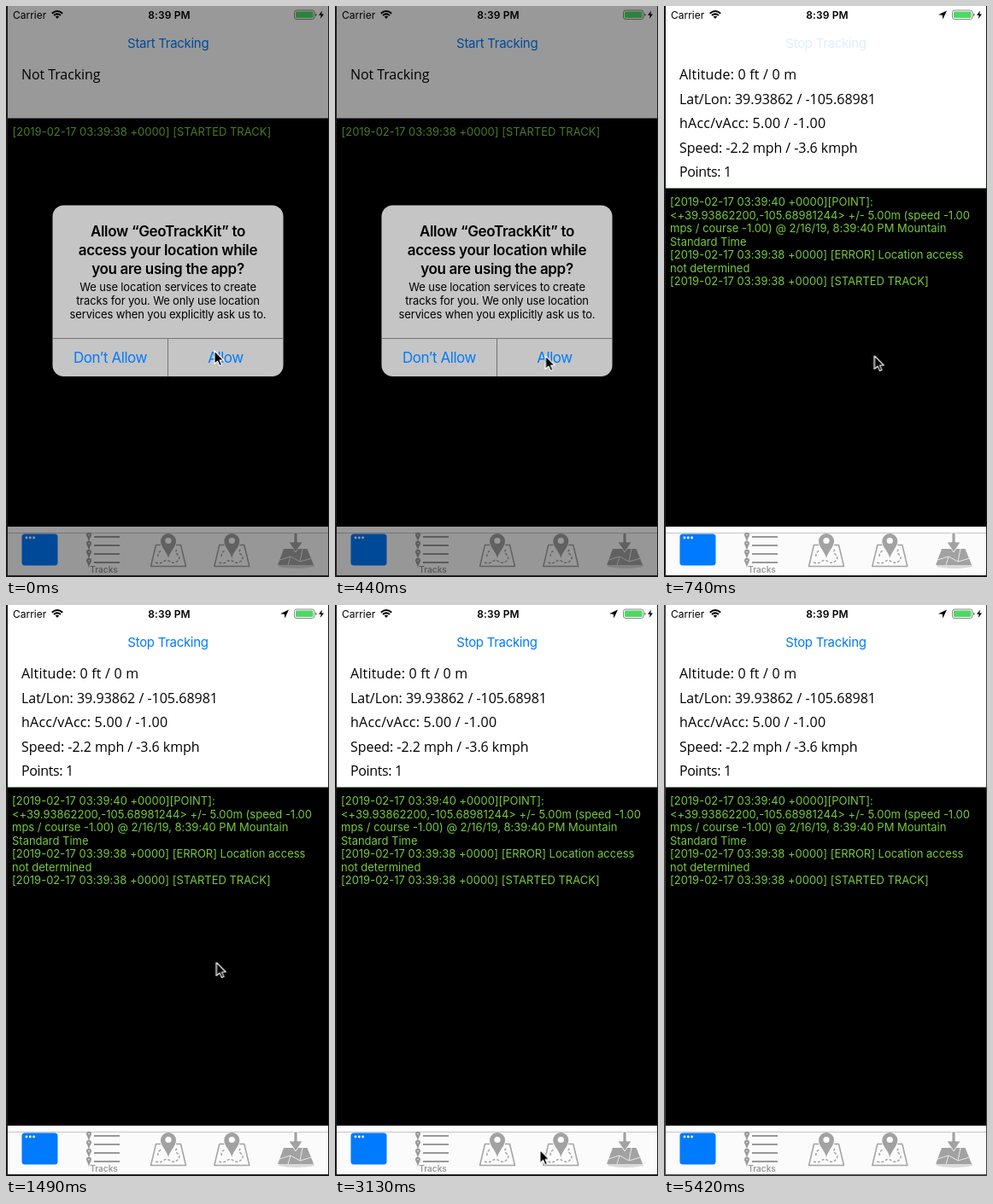
Animation, 378 px wide and 669 px high, one loop 5520 ms. Source, as an HTML page:

```html
<!DOCTYPE html>
<html lang="en">
<head>
<meta charset="utf-8">
<title>Location permission</title>
<style>
html, body { margin: 0; width: 100%; height: 100%; overflow: hidden; background: #000; }
svg { display: block; width: 100%; height: 100%; font-family: Inter, "Liberation Sans", sans-serif; }
.mid { text-anchor: middle; }
.link { font-size: 15px; letter-spacing: -.3px; fill: #007aff; }
.info { font: 16px "Open Sans", "Noto Sans", sans-serif; }
.log { font-size: 13px; letter-spacing: -.01px; fill: #78c93c; }
.title { font-size: 17px; font-weight: 600; letter-spacing: -.32px; }
.body { font-size: 13px; letter-spacing: -.14px; }
.button { font-size: 17px; letter-spacing: -.45px; fill: #007aff; }

.before, .after, .dim, .alert, .press, .short, .stop, .edge, .cursor {
  animation: 5520ms step-end infinite;
}
.before { animation-name: before; }
.after { animation-name: after; }
.dim { animation-name: dim; }
.alert { animation-name: alert; }
.press { animation-name: press; }
.short { animation-name: short; }
.stop { animation-name: stop; }
.edge { animation-name: edge; }
.cursor { animation-name: cursor; }

@keyframes before { 0% { opacity: 1 } 10.68%, 100% { opacity: 0 } }
@keyframes after { 0% { opacity: 0 } 10.68%, 100% { opacity: 1 } }
@keyframes dim { 0% { opacity: .4 } 10.68% { opacity: .05 } 13.4%, 100% { opacity: 0 } }
@keyframes alert { 0% { opacity: 1 } 10.68% { opacity: .12 } 13.4%, 100% { opacity: 0 } }
@keyframes press { 0% { opacity: 0 } 5.43% { opacity: 1 } 7.97%, 100% { opacity: 0 } }
@keyframes short { 0% { opacity: 0 } 10.68% { opacity: .45 } 13.4%, 100% { opacity: 0 } }
@keyframes stop {
  0% { opacity: 0 }
  13.4% { opacity: .13 }
  16.12% { opacity: .65 }
  18.84%, 100% { opacity: 1 }
}
@keyframes edge { 0% { fill: #1a1a1b } 98.18%, 100% { fill: #404042 } }
@keyframes cursor {
  0% { transform: translate(244px, 404px) }
  2.71% { transform: translate(246.5px, 410px) }
  26.99% { transform: translate(246.5px, 419px) }
  29.71% { transform: translate(250.5px, 503px) }
  32.42% { transform: translate(252px, 556px) }
  35.14% { transform: translate(241.5px, 594px) }
  37.68% { transform: translate(240px, 611.5px) }
  40.39% { transform: translate(240px, 626.5px) }
  43.11% { transform: translate(240px, 630.5px) }
  56.7% { transform: translate(240px, 638.5px) }
  59.42% { transform: translate(241px, 641.5px) }
  64.85% { transform: translate(259.5px, 655.5px); opacity: 1 }
  67.57%, 100% { transform: translate(259.5px, 655.5px); opacity: 0 }
}
</style>
</head>
<body>
<svg viewBox="0 0 378 669" preserveAspectRatio="none">
  <defs>
    <path id="pin" d="M0 5.6C-1-.4-3 -1.3-3-3.2a3 3 0 0 1 6 0C3-1.3 1-.4 0 5.6Z"/>
    <g id="row">
      <use href="#pin" y="1"/>
      <circle cy="-2.2" r=".8" fill="#fff"/>
      <path d="M6 0H36" stroke="#999" stroke-width="2"/>
    </g>
    <g id="map" fill="none" stroke="#a2a2a2">
      <path d="M-9 631.5H-14.5L-20.5 656.5H20.5L14.5 631.5H9" stroke-width="1.5" stroke-linejoin="round"/>
      <path d="M-15 652Q-10 654-6 651T2 651Q7 654 11 650T10 642Q7 639 11 636M-12 645Q-13 640-8 638" stroke-width="1.5" stroke-dasharray="3 2"/>
      <path d="M0 647C-1.5 639.5-9 634-9 627a9 9 0 0 1 18 0C9 634 1.5 639.5 0 647Z" fill="#a2a2a2" stroke="none"/>
      <circle cy="626.5" r="3.6" fill="#fff" stroke="none"/>
    </g>
  </defs>

  <rect class="edge" width="378" height="669"/>
  <rect x="2" width="375" height="667"/>

  <g class="before">
    <rect x="2" width="375" height="131.5" fill="#fff"/>
    <text class="link mid" x="189.7" y="48.5">Start Tracking</text>
    <text class="info" x="18" y="86" letter-spacing="-.08">Not Tracking</text>
    <text class="log" x="7.5" y="152">[2019-02-17 03:39:38 +0000] [STARTED TRACK]</text>
  </g>

  <g class="after">
    <rect x="2" width="375" height="213" fill="#fff"/>
    <rect x="2" y="213" width="375" height="1" fill="#6f8f6f"/>
    <text class="link mid short" x="189" y="48.5">Start…acking</text>
    <text class="link mid stop" x="189.5" y="48.5">Stop Tracking</text>
    <g class="info">
      <text x="18" y="86" letter-spacing=".2">Altitude: 0 ft / 0 m</text>
      <text x="18" y="114.5">Lat/Lon: 39.93862 / -105.68981</text>
      <text x="18" y="143" letter-spacing=".25">hAcc/vAcc: 5.00 / -1.00</text>
      <text x="18" y="171.5" letter-spacing="-.06">Speed: -2.2 mph / -3.6 kmph</text>
      <text x="18" y="200" letter-spacing="-.35">Points: 1</text>
    </g>
    <g class="log">
      <text x="7" y="234">[2019-02-17 03:39:40 +0000][POINT]:</text>
      <text x="7" y="249.5">&lt;+39.93862200,-105.68981244&gt; +/- 5.00m (speed -1.00</text>
      <text x="7" y="265">mps / course -1.00) @ 2/16/19, 8:39:40 PM Mountain</text>
      <text x="7" y="280.5">Standard Time</text>
      <text x="7" y="296">[2019-02-17 03:39:38 +0000] [ERROR] Location access</text>
      <text x="7" y="311.5">not determined</text>
      <text x="7" y="327">[2019-02-17 03:39:38 +0000] [STARTED TRACK]</text>
    </g>
    <path d="M331 5.5L321 10.2L325.8 10.8L326.3 15.5Z"/>
  </g>

  <!-- status bar -->
  <text x="8" y="14.5" font-size="12">Carrier</text>
  <g fill="none" stroke="#000" stroke-width="2">
    <path d="M53.8 8.7Q60 3.2 66.2 8.7M56 11.1Q60 7.6 64 11.1"/>
    <path d="M57.7 12.6Q60 10.8 62.3 12.6L60 15Z" fill="#000" stroke="none"/>
  </g>
  <text class="mid" x="191" y="14.5" font-size="12" font-weight="600" letter-spacing=".1">8:39 PM</text>
  <rect x="337.5" y="5" width="23.5" height="10.5" rx="2.5" fill="none" stroke="#858585"/>
  <rect x="339" y="6.5" width="20.5" height="7.5" rx="1.2" fill="#4cd964"/>
  <path d="M362 8.5Q363.6 8.8 363.6 10.2T362 12Z" fill="#858585"/>
  <path d="M370 5.5L366 10.7H368.7L367.8 15L372 9.4H369.2Z"/>

  <!-- tab bar -->
  <rect x="2" y="610" width="375" height="57" fill="#fff"/>
  <rect x="2" y="617" width="375" height="50" fill="#fbfbfb"/>
  <rect x="2" y="617" width="375" height="1" fill="#c4c4c4"/>
  <rect x="18.5" y="618.5" width="42" height="37" rx="3.5" fill="#007aff"/>
  <g fill="#fff">
    <circle cx="24" cy="623" r="1.4"/><circle cx="28.3" cy="623" r="1.4"/><circle cx="32.6" cy="623" r="1.4"/>
  </g>
  <g fill="#999">
    <use href="#row" x="97" y="622"/>
    <use href="#row" x="97" y="632"/>
    <use href="#row" x="97" y="642"/>
    <use href="#row" x="97" y="652"/>
    <text class="mid" x="114.5" y="663.5" font-size="10" font-weight="600">Tracks</text>
  </g>
  <use href="#map" x="190"/>
  <use href="#map" x="264.3"/>
  <path d="M326 638H353L361 657Q340 661 319 657Z" fill="#d8d8d8"/>
  <path d="M325 636H352.5L360 655H318Z" fill="#a2a2a2"/>
  <path d="M320 649L333 645L344 651L358 647M333 645L330 655M344 651L347 636" fill="none" stroke="#e8e8e8"/>
  <path d="M337 617H341V628H347L339 640L331 628H337Z" fill="#a2a2a2" stroke="#fff" stroke-width=".8"/>

  <rect class="dim" x="2" width="375" height="667"/>

  <g class="alert">
    <rect x="54.5" y="233.5" width="270" height="200.5" rx="13" fill="#c5c5c5"/>
    <path class="press" d="M190 390H324.5V421A13 13 0 0 1 311.5 434H190Z" fill="#b4b4b4"/>
    <path d="M54.5 389.5H324.5M189.5 389.5V434" stroke="#747474"/>
    <g class="title mid">
      <text x="189.5" y="270">Allow “GeoTrackKit” to</text>
      <text x="189.5" y="292">access your location while</text>
      <text x="189.5" y="314">you are using the app?</text>
    </g>
    <g class="body mid">
      <text x="189.5" y="333.5">We use location services to create</text>
      <text x="189.5" y="349.5">tracks for you. We only use location</text>
      <text x="189.5" y="365.5">services when you explicitly ask us to.</text>
    </g>
    <text class="button mid" x="122" y="418">Don’t Allow</text>
    <text class="button mid" x="257" y="418">Allow</text>
  </g>

  <path class="cursor" d="M0 0V15.3L3.6 12L6 17.5L8.5 16.4L6.1 11H10.8Z" stroke="#fff" stroke-width="1.1" stroke-linejoin="round"/>
</svg>
</body>
</html>
```
